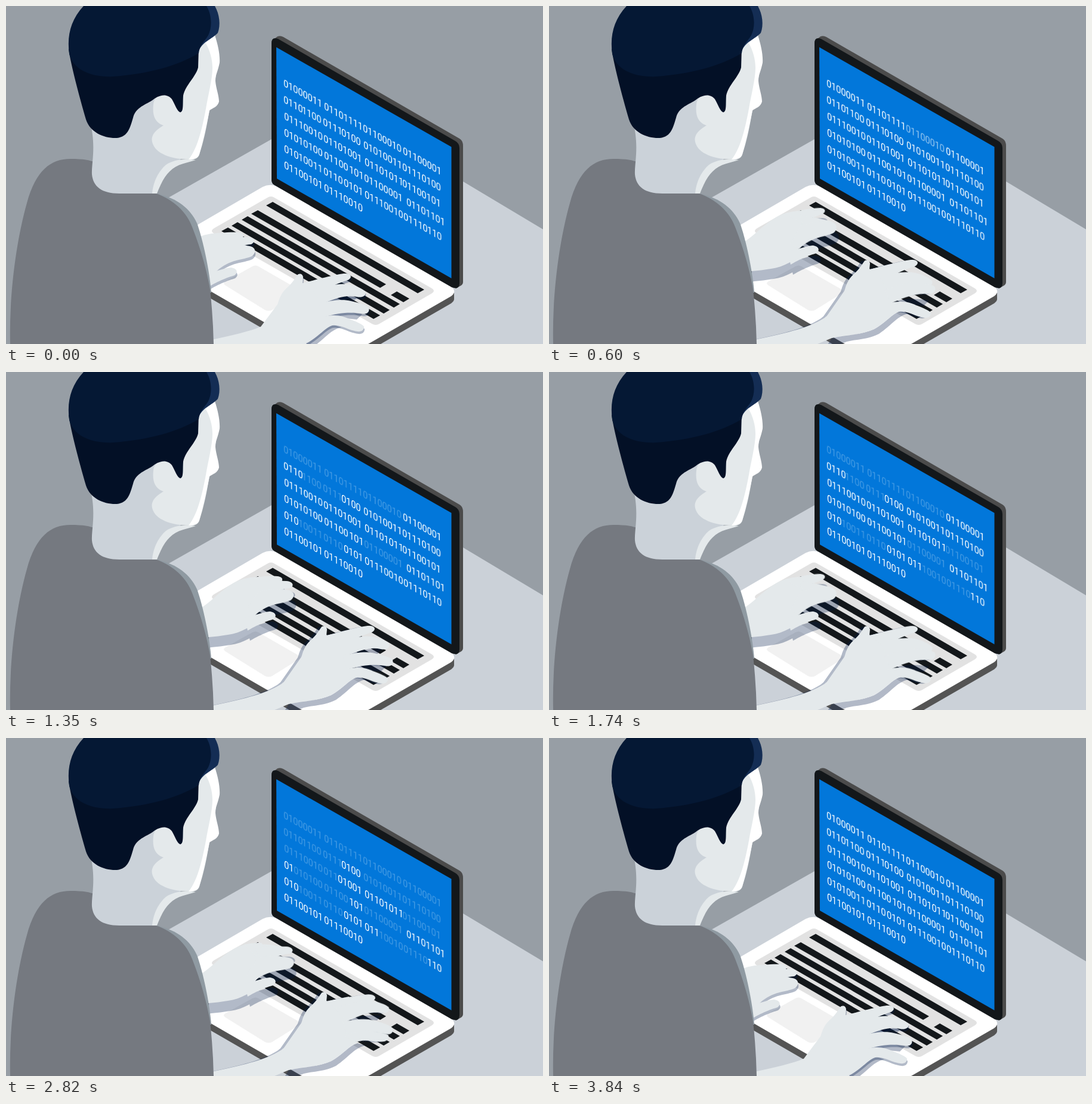
Write an HTML page that moves like this. It is 900 px wide and 566 px high and loops after 5400 ms.

```html
<!DOCTYPE html>
<html lang="en">
<head>
<meta charset="utf-8">
<title>Typing binary</title>
<style>
html, body { margin: 0; width: 100%; height: 100%; overflow: hidden; background: #979ea5; }
svg { display: block; width: 100vw; height: 100vh; }
text { font: 400 17px Roboto, sans-serif; letter-spacing: -.2px; fill: #fff; }
.skin { fill: #e4e9eb; }
.key { fill: #13171a; }
.shade { fill: #001948; fill-opacity: .3; }
.left, .right, .arm, .cast, .tap { animation: 5400ms ease-in-out infinite; }
.left { animation-name: reach-left; }
.right { animation-name: reach-right; }
.arm { animation-name: reach-arm; }
.cast-l { animation-name: cast-left; }
.cast-r { animation-name: cast-right; }

@keyframes reach-left {
  0%, .5%, 65%, 100% { transform: translate(-65px, 37px); }
  10.6%, 55.5% { transform: none; }
}
@keyframes reach-right {
  0%, .5%, 65%, 100% { transform: translate(-40px, 23px); }
  10.6%, 55.5% { transform: none; }
}
@keyframes reach-arm {
  0%, .5%, 65%, 100% { d: path("M300 572L349 558C380 551 408 545 427 537L460 493L505 568C480 575 450 568 434 579L410 589L400 613L300 613Z"); }
  10.6%, 55.5% { d: path("M300 572L349 558C400 547 440 538 465 520L500 470L545 541C520 552 490 547 474 556L450 566L440 590L300 590Z"); }
}
@keyframes cast-left {
  0%, .5%, 65%, 100% { filter: drop-shadow(1px 5px 0 rgba(0, 25, 72, .3)); }
  10.6%, 55.5% { filter: drop-shadow(4px 17px 0 rgba(0, 25, 72, .3)); }
}
@keyframes cast-right {
  0%, .5%, 65%, 100% { filter: drop-shadow(1px 4px 0 rgba(0, 25, 72, .3)); }
  10.6%, 55.5% { filter: drop-shadow(-6px 1px 0 rgba(0, 25, 72, .3)); }
}

/* finger taps, each about its own knuckle */
.la { animation-name: la; transform-origin: 410px 352px; }
.lb { animation-name: lb; transform-origin: 425px 364px; }
.lc { animation-name: lc; transform-origin: 420px 385px; }
.ra { animation-name: ra; transform-origin: 545px 448px; }
.rb { animation-name: rb; transform-origin: 560px 462px; }
.rc { animation-name: rc; transform-origin: 570px 486px; }
.rd { animation-name: rd; transform-origin: 575px 502px; }
@keyframes la {
  0%, 6%, 17%, 26%, 38%, 47%, 60%, 100% { transform: none; }
  11%, 32% { transform: rotate(-5deg); }
  52% { transform: rotate(8deg); }
}
@keyframes lb {
  0%, 6%, 17%, 26%, 38%, 60%, 100% { transform: none; }
  11%, 32% { transform: rotate(13deg); }
  52% { transform: rotate(-1deg); }
}
@keyframes lc {
  0%, 6%, 17%, 26%, 38%, 60%, 100% { transform: none; }
  11%, 32% { transform: rotate(-2deg); }
  21%, 45% { transform: rotate(4deg); }
  52% { transform: rotate(3deg); }
}
@keyframes ra {
  0%, 12%, 25%, 33%, 60%, 100% { transform: none; }
  18%, 29%, 41% { transform: rotate(3deg); }
  52% { transform: rotate(4deg); }
}
@keyframes rb {
  0%, 6%, 17%, 26%, 38%, 60%, 100% { transform: none; }
  11%, 32% { transform: rotate(4deg); }
  52% { transform: rotate(-3deg); }
}
@keyframes rc {
  0%, 6%, 17%, 26%, 38%, 60%, 100% { transform: none; }
  11%, 32% { transform: rotate(-9deg); }
  52% { transform: rotate(3deg); }
}
@keyframes rd {
  0%, 12%, 24%, 34%, 42%, 60%, 100% { transform: none; }
  18%, 29% { transform: rotate(-4deg); }
  52% { transform: rotate(-14deg); }
}
</style>
</head>
<body>
<svg viewBox="0 0 900 566" preserveAspectRatio="none">
  <rect width="900" height="566" fill="#979ea5"/>
  <path fill="#cbd1d8" d="M200 362L549 164L900 374V566H200Z"/>

  <!-- laptop base -->
  <path fill="#545454" d="M340 488L320 379L452 314L745 470Q751 474 751 480V491Q751 494 746 498L628 566H475Z"/>
  <path fill="#fff" d="M320 367L430 303Q442 297 453 302L745 469Q757 478 746 486L607 566H496L340 476V440Z"/>
  <path fill="#e2e2e2" d="M438 321Q444 317 450 321L714 473Q720 477 714 481L626 532Q620 536 613 532L349 381Q341 377 349 372Z"/>
  <path fill="#f1f1f1" d="M368 461L413 436Q418 433 423 436L491 475Q495 478 491 481L446 509Q440 512 434 509L368 468Q362 464 368 461Z"/>
  <g class="key">
    <path d="M436 334L447 328L701 475L690 481Z"/>
    <path d="M411 348L422 342L637 466L627 472Z"/>
    <path d="M645 484L655 478L676 490L666 496Z"/>
    <path d="M395 358L405 352L660 499L650 505Z"/>
    <path d="M378 368L388 362L643 509L633 515Z"/>
    <path d="M361 377L372 371L627 518L616 524Z"/>
  </g>

  <!-- laptop lid -->
  <path fill="#4b4b4b" d="M447 57L455 51Q460 49 465 52L760 222Q766 226 766 234V462Q766 467 761 469L754 473Z"/>
  <path class="key" d="M445 62Q445 51 456 55L753 226Q760 230 760 238V464Q760 476 747 471L450 300Q445 297 445 292Z"/>
  <path fill="#0277da" d="M453 69L746.5 236V456L454 289Z"/>
  <g id="code"></g>

  <!-- left hand -->
  <g class="cast cast-l"><g class="left skin">
    <path d="M270 430L330 393C345 383 360 366 380 354C395 345 412 343 428 343L440 362L447 386C434 390 425 398 416 409L425 417C412 424 395 437 372 440C360 442 350 443 340 444L270 460Z"/>
    <path class="tap la" d="M398 347C420 343 440 341 455 342C465 343 466 350 457 353C447 356 435 358 420 364Z"/>
    <path class="tap lb" d="M418 352C440 349 455 350 470 350C481 351 484 358 476 362C462 363 450 368 430 376Z"/>
    <path class="tap lc" d="M422 368C445 361 460 363 473 365C484 367 485 376 477 382C462 389 441 386 418 407L404 398Z"/>
    <path d="M400 412C420 406 432 402 442 401C452 402 455 409 448 414C436 418 428 420 405 433Z"/>
  </g></g>

  <!-- right hand -->
  <g class="right shade">
    <path d="M474 556C500 551 525 550 545 541C565 530 575 515 589 511L602 515C582 520 574 535 553 549C530 561 505 557 490 566L464 572Z"/>
    <path d="M568 476C585 464 610 464 628 465L622 473L600 471Z"/>
    <path d="M574 497C595 488 620 490 637 493L628 502L600 499Z"/>
  </g>
  <g class="cast cast-r skin">
    <path class="arm" d="M300 572L349 558C380 551 408 545 427 537L460 493L505 568C480 575 450 568 434 579L410 589L400 613L300 613Z"/>
    <g class="right">
      <path d="M463 521C484 508 492 496 494 482C498 464 503 455 514 446C520 440 524 434 528 428C531 424 537 425 538 431L537 441L575 433L570 456L572 474L576 497L589 511C575 515 565 530 545 541C525 550 500 551 474 556L456 545Z"/>
      <path class="tap ra" d="M535 442C560 435 590 427 606 425C618 424 622 431 613 436C600 440 585 446 564 458Z"/>
      <path class="tap rb" d="M553 452C580 445 600 441 612 443C625 445 637 450 642 455C644 463 637 466 628 464C612 460 595 465 569 476Z"/>
      <path class="tap rc" d="M564 475C590 469 605 468 618 471C632 474 645 478 648 482C650 490 645 494 635 492C618 489 600 490 572 498Z"/>
      <path class="tap rd" d="M568 498C590 492 605 496 615 501C628 506 638 510 640 514C640 521 634 524 624 521C608 517 600 510 586 512Z"/>
    </g>
  </g>

  <!-- body -->
  <path fill="#8f9aa2" d="M246 313C286 319 311 341 321 366C333 402 342 452 344 480L330 480L250 340Z"/>
  <path fill="#757980" d="M7 566C5 480 18 390 35 330C50 275 75 256 108 256C130 256 140 258 150 262L200 300L252 314C281 325 302 344 312 370C327 408 337 445 342 475Q347 520 348 566Z"/>

  <!-- neck and face -->
  <path fill="#cbd2d9" d="M140 190C152 235 143 262 144 282C146 302 160 314 190 314H248C252 292 262 273 290 262L310 220L260 140L200 150Z"/>
  <path class="skin" d="M245 314H253C262 291 272 271 297 264L318 258C298 255 280 258 268 266C252 280 246 300 245 314Z"/>
  <path class="skin" d="M247 165C248 150 262 146 275 150L325 65L350 50C360 80 352 108 351 125L340 180C334 215 330 230 324 249Q321 258 308 257C285 257 262 252 250 238C240 224 243 212 264 200C249 195 245 182 247 165Z"/>
  <path fill="#fff" d="M334 61L350 49C355 64 359 82 358 95C355 110 350 118 351 126C352 138 357 150 357 160C355 169 346 171 341 175C337 195 331 225 324 248Q321 257 306 257C320 240 328 210 335 172C339 148 346 122 346 104C346 90 342 74 334 61Z"/>

  <!-- hair -->
  <path fill="#031026" d="M105 72C109 100 122 148 134 190C141 212 165 222 186 221C205 219 208 203 213 187C217 171 230 167 245 158C258 147 271 147 278 156C283 164 287 177 292 178C298 177 296 164 297 150C301 132 318 119 322 103L323 70Z"/>
  <path fill="#142d54" d="M330 0H350C358 14 360 32 355 45C345 56 328 60 323 76L310 60Z"/>
  <path fill="#051834" d="M130 0C108 24 102 50 106 80C112 106 142 120 180 118C230 115 285 102 323 79C324 66 333 59 339 49C346 35 345 15 336 0Z"/>
</svg>
<script>
// each item: x:digits, with @ms when that run fades out
const lines = [
  '466:01000011@1040 534:01101111@1000 599:01100010@510 666:01100001@1780',
  '466:0110@1820 497:1100@720 532:0111@720 563:0100 600:01010011@1860 665:01110100@1900',
  '467:01110010@1940 533:011@1940 557:01001 602:01101011 665:01100101@1380',
  '467:01 483:010100@2000 534:01100@2000 576:101 601:01100001@820 672:01101101',
  '467:010 491:10011@920 533:0110@920 567:0101 602:011 626:10010@1500 667:01110@1500 707:110',
  '467:01100101 534:01110010'
];
const loop = 5400, fade = 160, dim = .26;
const code = document.getElementById('code');

function addRun(row, x, digits, start) {
  const el = document.createElementNS('http://www.w3.org/2000/svg', 'text');
  const y = 134 + 27.3 * row + .566 * (x - 466);
  el.setAttribute('transform', `matrix(.866 .49 0 1 ${x - 1} ${y})`);
  el.textContent = digits;
  code.append(el);
  if (!start) return;
  const key = (ms, opacity) => ({ offset: ms / loop, opacity });
  el.animate([key(0, 1), key(start, 1), key(start + fade, dim), key(3050, dim), key(3400, 1), key(loop, 1)],
    { duration: loop, iterations: Infinity });
}

lines.forEach((line, row) => line.split(' ').forEach(item => {
  const [, x, digits, start] = item.match(/(\d+):(\d+)@?(\d*)/);
  addRun(row, +x, digits, +start);
}));
</script>
</body>
</html>
```
